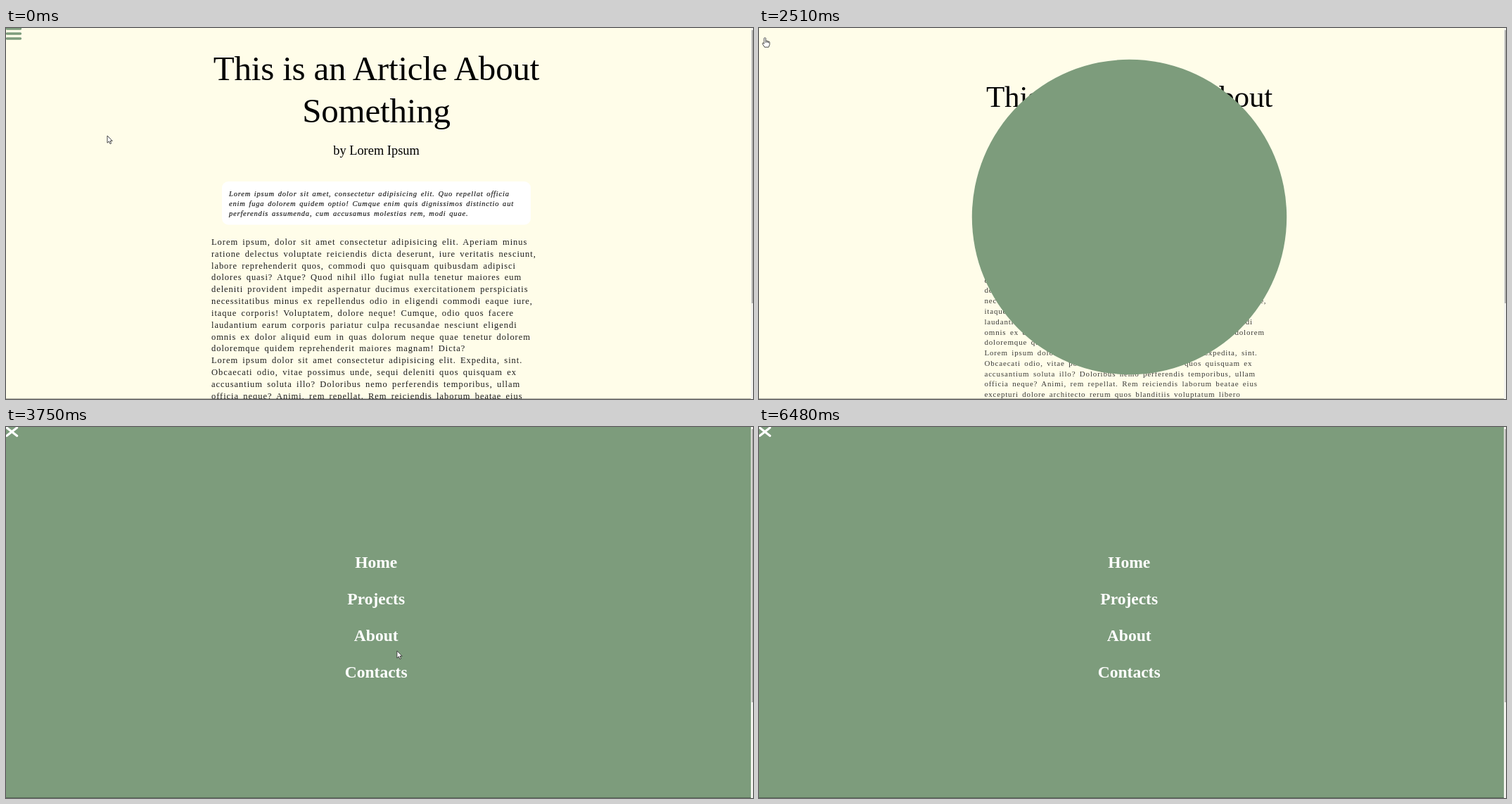
An HTML page for the animation above (6.58 s loop, 1062x527 px).

```html
<!DOCTYPE html>
<html lang="en">
<head>
<meta charset="utf-8">
<title>Article with menu</title>
<style>
  html, body { margin: 0; width: 100%; height: 100%; overflow: hidden; background: #fffde9; }
  svg { display: block; width: 100%; height: 100%; }
  text { font-family: "Liberation Serif", "Noto Serif", serif; white-space: pre; }
  .mid { text-anchor: middle; }
  .title { font-size: 49px; letter-spacing: -.2px; }
  .by { font-size: 18.4px; }
  .quote { font-size: 10.5px; font-style: italic; letter-spacing: .8px; word-spacing: 1.4px; fill: #222; stroke: #222; stroke-width: .2px; }
  .body { font-size: 12.5px; letter-spacing: .95px; word-spacing: 2.2px; fill: #1c1c1c; }
  .link { font-size: 23.5px; font-weight: bold; fill: #fff; }
  .bar { stroke-linecap: round; fill: none; }
</style>
</head>
<body>
<svg viewBox="0 0 1062 527">
  <rect width="1062" height="527" fill="#fffde9"/>
  <path id="burger" class="bar" d="M1.5 1H20.5M1.5 8H20.5M1.5 15H20.5" stroke="#7d9c7c" stroke-width="3.4"/>
  <g id="article">
    <text class="title mid" x="526.5" y="74">This is an Article About</text>
    <text class="title mid" x="526.5" y="134">Something</text>
    <text class="by mid" x="526.5" y="180">by Lorem Ipsum</text>
    <rect x="307" y="218" width="439" height="61.5" rx="9" fill="#fff"/>
    <g id="copy"></g>
  </g>
  <circle id="disc" cx="526.5" cy="268.5" fill="#7d9c7c"/>
  <g id="links"></g>
  <path id="cross" class="bar" stroke="#fff" stroke-width="3.2"/>
  <rect y="526" width="1060" height="1" opacity=".3"/>
  <rect x="1059" width="3" height="527" fill="#f3f3ee"/>
  <rect x="1060" y="3" width="2" height="388" fill="#b4b4b0"/>
  <g id="cursor" stroke-linejoin="round">
    <path id="arrow" d="M0 0V10.2L2.4 8L4 11.6L5.7 10.8L4.1 7.4H7.2Z" fill="#fff" stroke="#333" stroke-width=".9"/>
    <path id="hand" d="M-1.3 6.8V1Q0 -.7 1.2 1V5Q2.5 4.2 3.4 5.3Q4.6 4.7 5.2 5.8Q6.6 5.6 6.6 7V10L5.2 13.7H-.6L-3.4 9.2Q-3.8 7.4 -2.4 7.6L-1.3 8.8ZM1.2 5V7.6M3.4 5.3V7.6M5.2 5.8V7.8" fill="#fff" stroke="#333" stroke-width=".9"/>
    <path id="beam" d="M0 -6V6" stroke="#718f71" stroke-width="1"/>
  </g>
</svg>
<script>
const LOOP = 6580;
const $ = id => document.getElementById(id);
const clamp = v => Math.max(0, Math.min(1, v));
const smooth = v => { v = clamp(v); return v * v * (3 - 2 * v); };
const show = (el, on) => el.setAttribute('visibility', on ? 'visible' : 'hidden');

function addText(parent, cls, x, y, str) {
  const el = document.createElementNS('http://www.w3.org/2000/svg', 'text');
  el.setAttribute('class', cls);
  el.setAttribute('x', x);
  el.setAttribute('y', y);
  el.textContent = str;
  return parent.appendChild(el);
}

// keys: [time, ...values]; eased between neighbours
function track(keys, t) {
  let i = 0;
  while (i < keys.length - 2 && t >= keys[i + 1][0]) i++;
  const a = keys[i], b = keys[i + 1];
  const p = smooth((t - a[0]) / (b[0] - a[0]));
  return a.slice(1).map((v, k) => v + (b[k + 1] - v) * p);
}

const quote = `Lorem ipsum dolor sit amet, consectetur adipisicing elit. Quo repellat officia
enim fuga dolorem quidem optio! Cumque enim quis dignissimos distinctio aut
perferendis assumenda, cum accusamus molestias rem, modi quae.`;
const body = `Lorem ipsum, dolor sit amet consectetur adipisicing elit. Aperiam minus
ratione delectus voluptate reiciendis dicta deserunt, iure veritatis nesciunt,
labore reprehenderit quos, commodi quo quisquam quibusdam adipisci
dolores quasi? Atque? Quod nihil illo fugiat nulla tenetur maiores eum
deleniti provident impedit aspernatur ducimus exercitationem perspiciatis
necessitatibus minus ex repellendus odio in eligendi commodi eaque iure,
itaque corporis! Voluptatem, dolore neque! Cumque, odio quos facere
laudantium earum corporis pariatur culpa recusandae nesciunt eligendi
omnis ex dolor aliquid eum in quas dolorum neque quae tenetur dolorem
doloremque quidem reprehenderit maiores magnam! Dicta?
Lorem ipsum dolor sit amet consectetur adipisicing elit. Expedita, sint.
Obcaecati odio, vitae possimus unde, sequi deleniti quos quisquam ex
accusantium soluta illo? Doloribus nemo perferendis temporibus, ullam
officia neque? Animi, rem repellat. Rem reiciendis laborum beatae eius
excepturi dolore architecto rerum quos blanditiis voluptatum libero
quisquam nihil tempora, fugit minima sapiente quae dolorem veniam
molestiae ipsa? Eveniet harum, natus placeat eaque cumque rerum.`;
quote.split('\n').forEach((s, i) => addText($('copy'), 'quote', 317, 238.5 + 14.1 * i, s));
body.split('\n').forEach((s, i) => addText($('copy'), 'body', 292, 308 + 16.82 * i, s));

const links = [
  { name: 'Home', half: 30, fade: [[4120, 1], [4230, .4], [4340, .4], [4610, 1]] },
  { name: 'Projects', half: 41, fade: [[3850, 1], [3960, .5], [4150, 1]] },
  { name: 'About', half: 31, fade: [[4390, 1], [4530, .5], [4740, 1]] },
  { name: 'Contacts', half: 45, fade: [[4560, 1], [4680, .4], [4780, .4], [5000, 1]] }
];
links.forEach((l, i) => {
  l.y = 192 + 52 * i;
  l.el = addText($('links'), 'link mid', 526.2, l.y + 8, l.name);
});

const pointer = [
  [30, 144, 153], [590, 3, 23], [690, 3, 22], [940, 8.5, 13.5], [2800, 8.5, 13.5],
  [3000, 551, 290], [3480, 551, 290], [3700, 558, 330], [3900, 545, 256], [4090, 540, 215],
  [4200, 535, 190], [4340, 538, 197], [4530, 541.5, 320], [4640, 540, 346], [4780, 530, 344],
  [4860, 474, 320], [4960, 474, 190], [5460, 962, 483], [5730, 1057, 526]
];

function drawCursor(t) {
  const [x, y] = track(pointer, t);
  const over = t > 3440 && links.some(l => Math.abs(x - 526) < l.half && Math.abs(y - l.y) < 14);
  const beam = t >= 2980 && t <= 3440;
  const hand = over || (t >= 760 && t < 2800);
  const on = t < 5730;
  $('cursor').setAttribute('transform', `translate(${x} ${y})`);
  show($('arrow'), on && !beam && !hand);
  show($('hand'), on && hand);
  show($('beam'), on && beam);
}

function draw(t) {
  const press = smooth((t - 1480) / 230);
  $('burger').setAttribute('opacity', 1 - press);
  $('copy').setAttribute('opacity', 1 - .14 * press);

  // the page swells a little, then shrinks away
  const p = clamp((t - 2123) / 541);
  const k = 1 - p * p * (2.70158 * p - 1.70158);
  $('article').setAttribute('transform', `translate(526.5 385) scale(${k}) translate(-526.5 -385)`);

  const d = Math.max(0, t - 2130);
  $('disc').setAttribute('r', Math.min(900, .37 * d + .00057 * d * d));

  links.forEach((l, i) => {
    const q = smooth((t - 2870 - 130 * i) / 400);
    l.el.setAttribute('opacity', q * track(l.fade, t)[0]);
    l.el.setAttribute('transform', `translate(0 ${20 * (1 - q)})`);
  });

  const [cx, cy, w, h] = track([[3040, 10.3, 9.2, 6.3, 7], [3560, 8.3, 6.8, 7.3, 5.8]], t);
  $('cross').setAttribute('d', `M${cx - w} ${cy - h}L${cx + w} ${cy + h}M${cx + w} ${cy - h}L${cx - w} ${cy + h}`);
  $('cross').setAttribute('opacity', smooth((t - 2810) / 200));

  drawCursor(t);
}

const start = performance.now();
function tick() {
  draw((performance.now() - start) % LOOP);
  requestAnimationFrame(tick);
}
tick();
</script>
</body>
</html>
```
